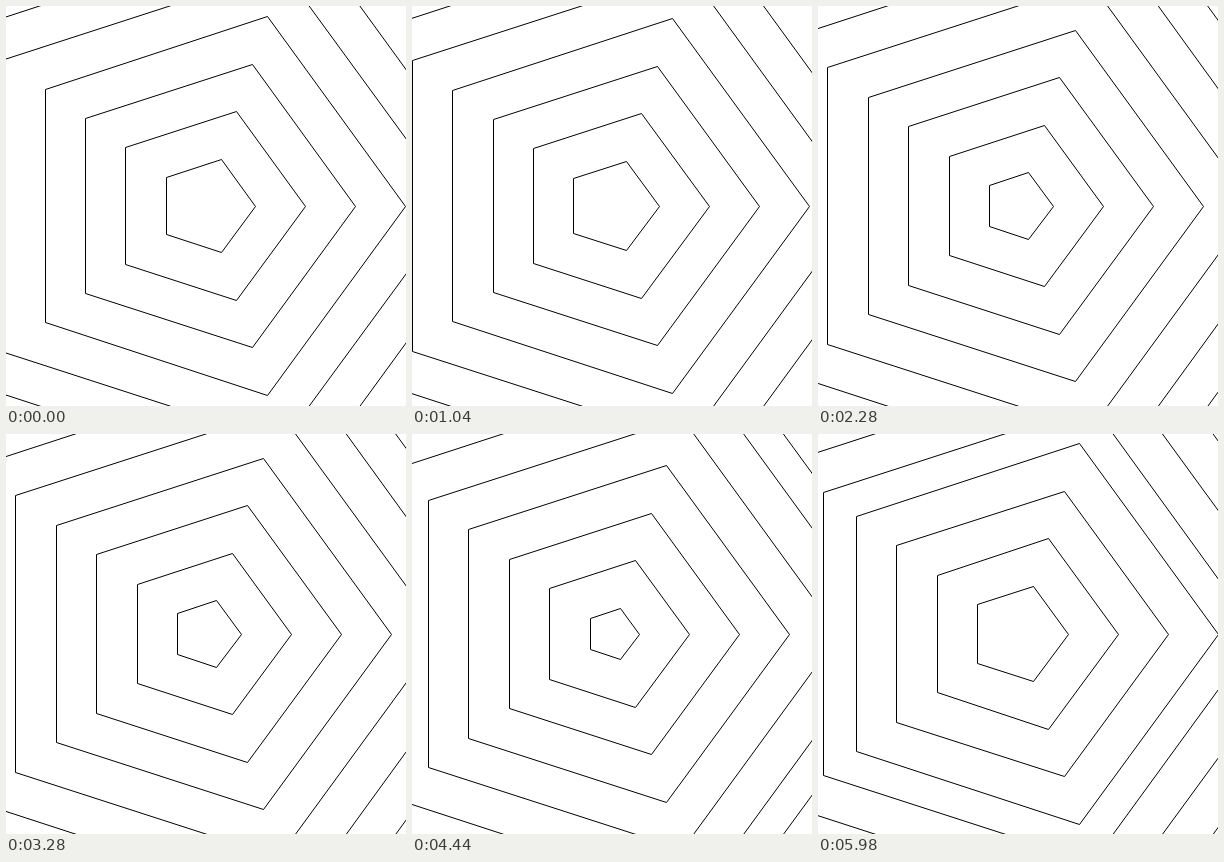
Recreate the animation shown at these times as an HTML page with a canvas. Size 400 by 400 pixels, loop 6000 ms.

```html
<!DOCTYPE html>
<html lang="en">
<head>
<meta charset="utf-8">
<title>Shrinking pentagons</title>
<style>
  html, body { margin: 0; width: 100%; height: 100%; overflow: hidden; background: #fff; }
  canvas { display: block; width: 400px; height: 400px; }
</style>
</head>
<body>
<canvas id="stage" width="400" height="400"></canvas>
<script>
const ctx = document.getElementById('stage').getContext('2d');
const SIZE = 400, CENTER = 200;
const LOOP = 6000, STEP = 20;
const GAP = 50, FIRST_RINGS = 10, SHORTFALL = 10;
const MAX_RADIUS = 400;

// Vertices sit on pixel centres so that upright edges stay crisp.
const snap = v => Math.floor(v + 1e-6) + 0.5;

function pentagon(radius) {
  ctx.beginPath();
  for (let i = 0; i < 5; i++) {
    const angle = i * Math.PI * 2 / 5;
    ctx.lineTo(snap(CENTER + radius * Math.cos(angle)),
               snap(CENTER + radius * Math.sin(angle)));
  }
  ctx.closePath();
  ctx.stroke();
}

// Rings after the first batch follow slightly closer behind it.
function startRadius(k) {
  return k * GAP - 1 - (k > FIRST_RINGS ? SHORTFALL : 0);
}

function draw(ms) {
  const tick = Math.floor((ms % LOOP) / STEP);
  ctx.fillStyle = '#fff';
  ctx.fillRect(0, 0, SIZE, SIZE);
  ctx.strokeStyle = '#000';
  ctx.lineWidth = 1;
  for (let k = 1; ; k++) {
    const radius = startRadius(k) - tick;
    if (radius > MAX_RADIUS) break;
    if (radius > 0) pentagon(radius);
  }
}

const start = performance.now();
function loop() {
  draw(performance.now() - start);
  requestAnimationFrame(loop);
}
loop();
</script>
</body>
</html>
```
